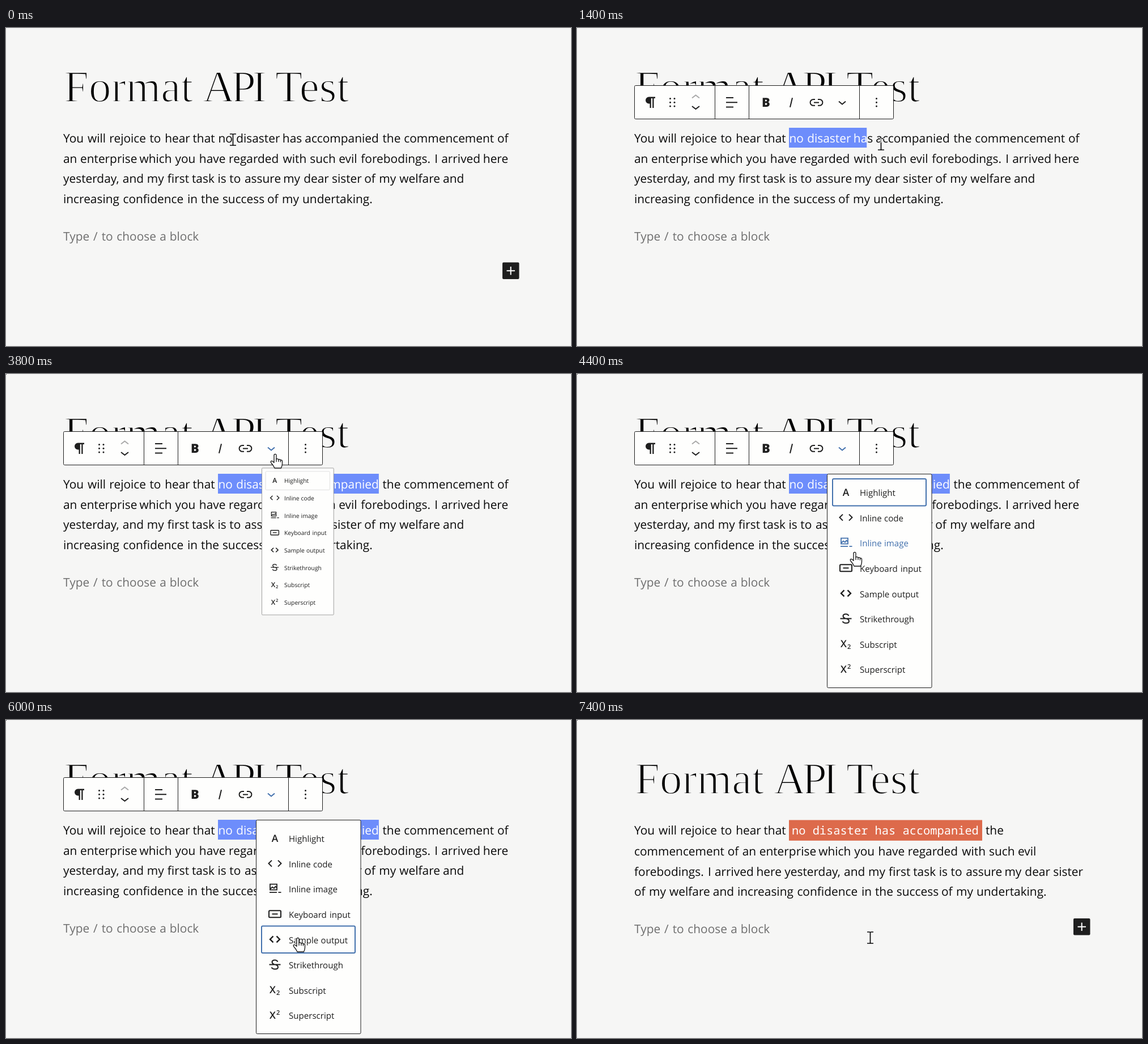
Recreate the animation shown at these times as an HTML page. Size 997 px wide and 561 px high, loop 7.8 s.

```html
<!DOCTYPE html>
<html lang="en">
<head>
<meta charset="utf-8">
<title>Format API Test</title>
<style>
  html, body { margin: 0; width: 100%; height: 100%; overflow: hidden; background: #f6f6f5; }
  svg { display: block; width: 997px; height: 561px; }
  text { font-family: "Open Sans", "Noto Sans", sans-serif; white-space: pre; text-rendering: geometricPrecision; }
  .title { font: 200 79px "Liberation Serif", serif; fill: #000; stroke: #f6f6f5; stroke-width: 2.2px; }
  .code { font: 20.38px "Noto Sans Mono", monospace; fill: #fff; }
  .icon { fill: none; stroke: currentColor; stroke-width: 2; }
  .icon text, .solid { fill: currentColor; stroke: none; }
  #beam { mix-blend-mode: difference; }
</style>
</head>
<body>
<svg id="stage" viewBox="0 0 997 561"></svg>
<script>
const LOOP = 7800, STEP = 200, BODY = 22.23, LEFT = 101;
const INK = '#1e1e1e', BLUE = '#4371ad', PAPER = '#fefefd';

// Advance widths in thousandths of an em: a to z, then the other characters.
const LOWER = [509, 588, 462, 589, 523, 313, 589, 566, 242, 242, 497, 242, 861,
  566, 586, 588, 588, 348, 424, 339, 566, 479, 723, 459, 484, 452];
const OTHER = { ' ': 274, '.': 217, ',': 217, '/': 390, I: 266, Y: 510, T: 510, H: 710, K: 580, S: 531 };
const advance = ch => OTHER[ch] ?? LOWER[ch.charCodeAt(0) - 97] ?? 550;
const measure = (str, size = BODY) => [...str].reduce((sum, ch) => sum + advance(ch), 0) * size / 1000;

function line(str, x, y, fill = '#0a0a0a', size = BODY) {
  let done = '';
  const words = str.split(' ').map(word => {
    const span = `<tspan x="${(x + measure(done, size)).toFixed(2)}">${word}</tspan>`;
    done += word + ' ';
    return span;
  });
  return `<text y="${y}" font-size="${size * 0.94}" fill="${fill}">${words.join('')}</text>`;
}

const LEAD = 'You will rejoice to hear that ';
const PICK = 'no disaster has accompanied';
const FIRST = LEAD + PICK + ' the commencement of';
const SEL_X = LEFT + measure(LEAD) - 0.5;

const plainLines = [
  FIRST,
  'an enterprise which you have regarded with such evil forebodings. I arrived here',
  'yesterday, and my first task is to assure my dear sister of my welfare and',
  'increasing confidence in the success of my undertaking.'
];
const codedLines = [
  'commencement of an enterprise which you have regarded with such evil',
  'forebodings. I arrived here yesterday, and my first task is to assure my dear sister',
  'of my welfare and increasing confidence in the success of my undertaking.'
];

const dots = (xs, ys) => xs.map(x => ys.map(y =>
  `<circle class="solid" cx="${x}" cy="${y}" r="1.5"/>`).join('')).join('');
const path = (d, extra = '') => `<path d="${d}" ${extra}/>`;

const toolbar = `
  <rect x="101.5" y="101.5" width="457" height="59" rx="2" fill="${PAPER}" stroke="${INK}"/>
  ${path('M243.5 102v58M303.5 102v58M498.5 102v58', `stroke="${INK}"`)}
  <g class="icon" color="${INK}">
    ${path('M138 121.5H127a6 6 0 0 0 0 12h1.5V141h2.3V124h2.4V141h2.3V124H138Z', 'class="solid"')}
    ${dots([164.5, 172], [124.5, 131.3, 138])}
    ${path('M203 123.5l6.5-5 6.5 5', 'stroke="#a9a9a9"')}
    ${path('M203 138l6.5 5 6.5-5')}
    ${path('M263 123h13M263 131.3h20M263 139.6h13')}
    <text x="333.5" y="139.3" font-size="22" font-weight="800" text-anchor="middle">B</text>
    ${path('M380 123.3l-4 16.5')}
    ${path('M420 126h-3a5.4 5.4 0 0 0 0 10.8h3M425 126h3a5.4 5.4 0 0 1 0 10.8h-3M418 131.4h9')}
    ${dots([528.5], [124.5, 131.3, 138])}
  </g>
  <rect id="toggle" x="449" y="112" width="38" height="38" rx="2" stroke-width="2"/>
  <path id="chevron" d="M462 129.5l6 5 6-5" fill="none" stroke-width="2"/>`;

const script = y => `<text x="-9.5" y="6" font-size="17.5" font-weight="600">X</text>
  <text x="2.5" y="${y}" font-size="11" font-weight="600">2</text>`;
const items = [
  ['Highlight', '<text y="6" font-size="17.5" font-weight="600" text-anchor="middle">A</text>'],
  ['Inline code', path('M-5.5-5.5l-5.5 5.5 5.5 5.5M5.5-5.5l5.5 5.5-5.5 5.5')],
  ['Inline image', path('M-8.5-8h12v10h-12zM-8 0l3.5-3 3 2 2.5-3 2 2M-9.5 6.5h13M6 6.5h5', 'stroke-width="1.8"')],
  ['Keyboard input', '<rect x="-10.5" y="-6" width="21" height="12" rx="1.5"/>' + path('M-5 0h10')],
  ['Sample output', path('M-3-5.5l-5.5 5.5 5.5 5.5M3-5.5l5.5 5.5-5.5 5.5', 'stroke-width="2.4"')],
  ['Strikethrough', path('M-10 0H10M5-5Q3.5-8 0-8Q-5-8-5-4.5Q-5-2-1 0M1 0Q5.5 1.5 5.5 4.5Q5.5 8 0 8Q-4 8-6 5')],
  ['Subscript', script(8.5)],
  ['Superscript', script(-1)]
];
const rowY = i => 209.3 + 44.6 * i;
const menu = `
  <rect id="panel" x="441.5" y="176.5" width="184.5" height="377" rx="2" fill="${PAPER}"/>
  <rect id="ring" x="451" width="165" height="47.5" rx="2" fill="none"/>
  ${items.map(([label, icon], i) => `<g class="row">
    <g class="icon" transform="translate(474.5 ${rowY(i) - 0.8})">${icon}</g>
    ${line(label, 499, rowY(i) + 5.8, 'currentColor', 16.05)}
  </g>`).join('')}`;

document.getElementById('stage').innerHTML = `
  <clipPath id="selClip"><rect id="clipBox" x="${SEL_X}" y="176" height="35"/></clipPath>
  <rect width="997" height="561" fill="#f6f6f5"/>
  <rect id="speck" width="1" height="1" fill="#333"/>
  <text class="title" x="102" y="129.5">Format</text>
  <text class="title" x="347" y="129.5" letter-spacing="-7">API</text>
  <text class="title" x="475" y="129.5">Test</text>
  <g id="plain">${plainLines.map((s, i) => line(s, LEFT, 202.3 + 35.5 * i)).join('')}</g>
  <g id="coded">
    ${line(LEAD.trim(), LEFT, 202.3)}
    <rect x="374" y="176.5" width="341" height="36.3" fill="#dd6a4b"/>
    ${line('the', 721, 202.3)}
    ${codedLines.map((s, i) => line(s, LEFT, 239.3 + 35.5 * i)).join('')}
  </g>
  <rect id="sel" y="176" height="35" fill="#6d8dfb"/>
  <g id="selText" clip-path="url(#selClip)">${line(FIRST, LEFT, 202.3, '#fff')}</g>
  <text id="codeText" class="code" x="379" y="202.3">${PICK}</text>
  <g id="hint">${line('Type / to choose a block', LEFT, 374.5, '#6e6e6e')}</g>
  <path id="caret" d="M101.5 352v30" stroke="#000"/>
  <g id="add">
    <rect x="876" y="413.5" width="29.5" height="29.5" rx="2" fill="${INK}"/>
    ${path('M883.5 428.3h14.5M890.7 421v14.5', 'stroke="#fff" stroke-width="2"')}
  </g>
  <g id="toolbar">${toolbar}</g>
  <g id="menu">${menu}</g>
  <path id="beam" d="M-5-10h4q1.5 0 1.5 1.5q0-1.5 1.5-1.5h4M.5-9V9M-5 10h4q1.5 0 1.5-1.5q0 1.5 1.5 1.5h4"
    fill="none" stroke="#fff" stroke-width="1.7"/>
  <g id="hand" stroke="#111" stroke-width="1.3" stroke-linejoin="round" stroke-linecap="round">
    ${path('M-2 2.5Q-2 .3 0 .3Q2 .3 2 2.5V9Q5 7.8 6 10Q9 8.8 9.5 11Q12.5 10.3 12.5 13V17.5Q12.5 20.5 10.5 25H-1Q-2.5 21-7 16Q-8.5 13.5-7 12.6Q-5 11.8-2 15.3Z', 'fill="#fff"')}
    ${path('M2 9v4.5M6 10v3.5M9.5 11.3v2.7', 'fill="none"')}
  </g>`;

const el = id => document.getElementById(id);
const set = (id, attrs) => Object.entries(attrs).forEach(([k, v]) => el(id).setAttribute(k, v));
const show = (id, on) => set(id, { display: on ? 'inline' : 'none' });
const rows = [...document.querySelectorAll('.row')];

// Pointer stops: time, x, y.
const stops = [
  [0, 400, 197], [400, 376, 197], [600, 376, 197], [1200, 513, 204], [1400, 536, 205],
  [2200, 663, 200], [2400, 663, 200], [2600, 660, 200], [3000, 602, 182], [3400, 476, 142],
  [3800, 475, 141], [4000, 476, 160], [4400, 490, 314], [4800, 495, 345], [5400, 508, 454],
  [5800, 515, 388], [6000, 515, 384], [6600, 515, 384], [6800, 517, 384], [LOOP, 517, 384]
];
function pointer(t) {
  const i = stops.findIndex(s => s[0] > t);
  const [t0, x0, y0] = stops[i - 1], [t1, x1, y1] = stops[i];
  const k = (t - t0) / (t1 - t0);
  return [x0 + (x1 - x0) * k, y0 + (y1 - y0) * k];
}

// Letter edges of the first line; the selection snaps to the nearest one.
const edges = Array.from({ length: FIRST.length + 1 }, (_, i) => LEFT - 0.5 + measure(FIRST.slice(0, i)));
const snap = x => edges.reduce((best, e) => Math.abs(e - x) < Math.abs(best - x) ? e : best);

function draw(time) {
  const t = Math.floor(time / STEP) * STEP;
  const during = (from, to) => t >= from && t < to;
  const [x, y] = pointer(t);
  const coded = t >= 6200, hand = during(3200, 6800);

  show('speck', t >= 1600);
  show('plain', !coded);
  show('coded', coded);
  show('codeText', coded);
  set('hint', { transform: `translate(0 ${coded ? 1.5 : 0})` });
  show('caret', during(6800, 7400));
  show('add', !during(800, 6800));
  set('add', { transform: `translate(0 ${coded ? -63.5 : 0})` });

  const from = coded ? 379 : SEL_X;
  const to = coded ? 710 : snap(pointer(Math.min(Math.max(t - STEP, 0), 2600))[0]);
  const width = Math.max(0, to - from);
  show('sel', during(800, 6800));
  show('selText', during(800, 6200));
  set('sel', { x: from, width });
  set('clipBox', { width });

  show('toolbar', during(800, 6800));
  show('toggle', t === 3600 || coded);
  set('toggle', { fill: coded ? INK : 'none', stroke: coded ? INK : BLUE });
  set('chevron', { stroke: coded ? '#fff' : t >= 3400 ? BLUE : INK });

  const opening = t === 3800, focus = t < 6000 ? 0 : 4;
  show('menu', during(3800, 6200));
  set('menu', { transform: opening ? 'translate(148.2 44.7) scale(.687)' : '' });
  set('panel', { stroke: opening ? '#777' : INK });
  set('ring', { y: rowY(focus) - 24.2, stroke: opening ? '#ddd' : BLUE, 'stroke-width': opening ? 1.3 : 2 });
  const hover = Math.round((y - rowY(0)) / 44.6);
  rows.forEach((row, i) => row.setAttribute('color', i === hover && i !== focus ? BLUE : INK));

  show('beam', !hand);
  show('hand', hand);
  set(hand ? 'hand' : 'beam', { transform: `translate(${x} ${y})` });
}

const start = performance.now();
function tick() {
  draw((performance.now() - start) % LOOP);
  requestAnimationFrame(tick);
}
tick();
</script>
</body>
</html>
```
